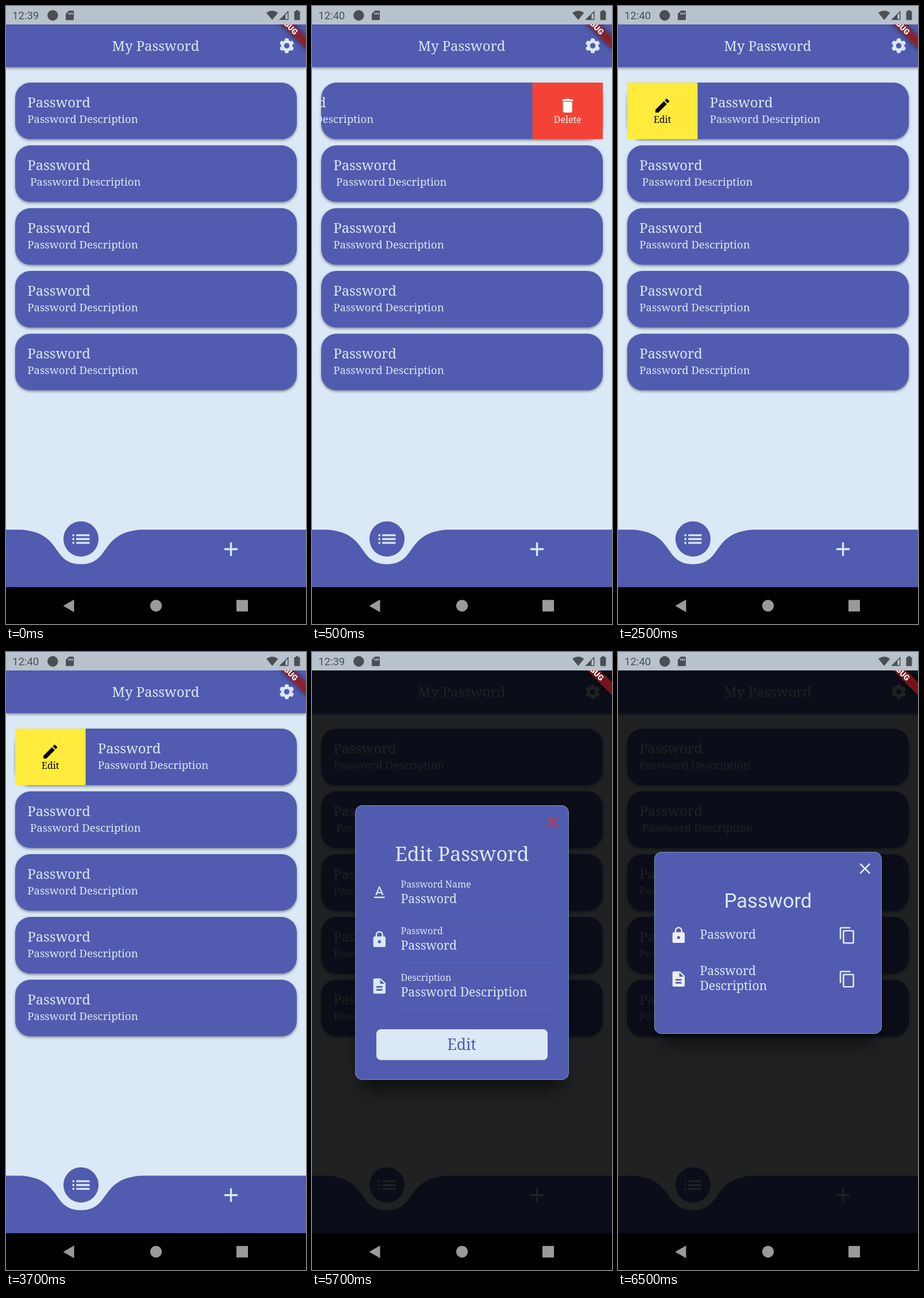
An HTML page for the animation above (8 s loop, 522 by 1073 pixels).

```html
<!DOCTYPE html>
<html lang="en">
<head>
<meta charset="utf-8">
<title>My Password</title>
<style>
  html, body { margin: 0; width: 100%; height: 100%; overflow: hidden; background: #dbe8f5; }
  svg { display: block; width: 100%; height: 100%; }
  text { font-family: "Noto Serif", serif; white-space: pre; }
  .sans { font-family: Roboto, sans-serif; }
</style>
</head>
<body>
<svg id="stage" viewBox="0 0 522 1073"></svg>
<script>
const LIGHT = '#dbe8f5', INDIGO = '#515bb0', GREY = '#4b4f54';
const DP = 522 / 392.727; // pixels per density-independent unit
const LOOP = 8000;

const ICONS = {
  list: 'M3 13h2v-2H3zm0 4h2v-2H3zm0-8h2V7H3zm4 4h14v-2H7zm0 4h14v-2H7zM7 7v2h14V7z',
  add: 'M19 13h-6v6h-2v-6H5v-2h6V5h2v6h6z',
  trash: 'M6 19c0 1.1.9 2 2 2h8c1.1 0 2-.9 2-2V7H6zM19 4h-3.5l-1-1h-5l-1 1H5v2h14z',
  pencil: 'M3 17.25V21h3.75L17.81 9.94l-3.75-3.75zM20.71 7.04c.39-.39.39-1.02 0-1.41l-2.34-2.34c-.39-.39-1.02-.39-1.41 0l-1.83 1.83 3.75 3.75z',
  close: 'M19 6.41L17.59 5 12 10.59 6.41 5 5 6.41 10.59 12 5 17.59 6.41 19 12 13.41 17.59 19 19 17.59 13.41 12z',
  letter: 'M5 17v2h14v-2zm4.5-4.2h5l.9 2.2h2.1L12.75 4h-1.5L6.5 15h2.1zM12 5.98L13.87 11h-3.74z',
  lock: 'M18 8h-1V6A5 5 0 0 0 7 6v2H6a2 2 0 0 0-2 2v10a2 2 0 0 0 2 2h12a2 2 0 0 0 2-2V10a2 2 0 0 0-2-2zm-6 9a2 2 0 1 1 0-4 2 2 0 0 1 0 4zm3.1-9H8.9V6a3.1 3.1 0 0 1 6.2 0z',
  page: 'M14 2H6a2 2 0 0 0-2 2v16a2 2 0 0 0 2 2h12a2 2 0 0 0 2-2V8zm2 16H8v-2h8zm0-4H8v-2h8zm-3-5V3.5L18.5 9z',
  copy: 'M16 1H4a2 2 0 0 0-2 2v14h2V3h12zm3 4H8a2 2 0 0 0-2 2v14a2 2 0 0 0 2 2h11a2 2 0 0 0 2-2V7a2 2 0 0 0-2-2zm0 16H8V7h11z'
};

const icon = (name, x, y, fill = LIGHT, size = 24) =>
  `<path fill="${fill}" fill-rule="evenodd" d="${ICONS[name]}"
    transform="translate(${x} ${y}) scale(${size * DP / 24}) translate(-12 -12)"/>`;

const text = (label, x, y, size, fill = LIGHT, extra = '') =>
  `<text x="${x}" y="${y}" font-size="${size * DP}" fill="${fill}" ${extra}>${label}</text>`;

const rect = (x, y, w, h, fill, r = 0, extra = '') =>
  `<rect x="${x}" y="${y}" width="${w}" height="${h}" rx="${r}" fill="${fill}" ${extra}/>`;

const MIDDLE = 'text-anchor="middle"';

function gear(x, y) {
  const tooth = [0, 60, 120, 180, 240, 300].map(a =>
    `<path d="M-3.1-6L-2.2-9.2Q-2.1-9.6-1.7-9.6H1.7Q2.1-9.6 2.2-9.2L3.1-6z" transform="rotate(${a})"/>`).join('');
  return `<g transform="translate(${x} ${y}) scale(${DP})" fill="${LIGHT}">${tooth}
    <circle r="5.5" fill="none" stroke="${LIGHT}" stroke-width="3.8"/></g>`;
}

function cards() {
  let out = '';
  for (let i = 0; i < 5; i++) {
    const y = 133 + 109 * i;
    out += rect(16, y, 490, 98.2, INDIGO, 26.6, 'filter="url(#lift)"');
    out += `<g ${i ? '' : 'id="slider"'}>` +
      text('Password', 37.2, y + 43, 18) +
      text('Password Description', i === 1 ? 42 : 37.2, y + 70, 14) + '</g>';
  }
  return out;
}

function bottomBar() {
  const w = 522, h = 75 * DP, top = 1009 - h;
  const p = (fx, fy) => `${fx * w} ${top + fy * h} `;
  return `<path fill="${INDIGO}" d="M${p(0, 0)}L${p(.05, 0)}C${p(.19, .05)}${p(.15, .6)}${p(.25, .6)}` +
    `C${p(.35, .6)}${p(.31, .05)}${p(.45, 0)}L${p(1, 0)}V1010H0z"/>
    <circle cx="130.5" cy="925.3" r="30.6" fill="${INDIGO}"/>` +
    icon('list', 130.5, 925.5, LIGHT, 30) + icon('add', 391.5, 943, LIGHT, 30);
}

const debugRibbon = () => `<g clip-path="url(#belowStatus)"><g transform="translate(522 0) rotate(45)">
  ${rect(-53.2, 37.2, 106.4, 16, '#000', 0, 'opacity=".5" filter="url(#soft)"')}
  ${rect(-53.2, 37.2, 106.4, 16, '#b71c1c', 0, 'opacity=".63"')}
  ${text('DEBUG', 0, 50, 10.2, '#fff', MIDDLE + ' class="sans" font-weight="900"')}</g></g>`;

const statusBar = () => rect(0, 0, 522, 32, '#b8c2cc') +
  text('', 11, 23, 14, GREY, 'id="clock" class="sans"') +
  `<g fill="${GREY}">
    <circle cx="81.3" cy="16.2" r="9.2"/>
    <path fill-rule="evenodd" d="M109.5 8H116.500q1.500 0 1.500 1.500V23q0 1.500-1.500 1.500H105.500q-1.500 0-1.500-1.500V13.500zM108.500 11.500v3.500h1.800v-3.500zm3 0v3.500h1.800v-3.500zm3 0v3.500h1.800v-3.500z"/>
    <path d="M453 11.700Q463.200 4.300 473.400 11.700L463.200 24.300z"/>
    <path fill-rule="evenodd" d="M491.500 8V24.300H475.200zM490 11.700L486.300 15.400V22.800H490z"/>
    <path d="M504.500 7h4v2h1.700q1.300 0 1.300 1.300V23q0 1.500-1.300 1.500h-7.400q-1.300 0-1.300-1.500V10.300q0-1.300 1.300-1.300h1.700z"/>
  </g>`;

const navBar = () => rect(0, 1009, 522, 64, '#000') + `<g fill="#9a9a9a">
  <path d="M118.500 1030.500V1052.500L99.500 1041.500z"/><circle cx="261" cy="1041.200" r="10.200"/></g>` +
  rect(401, 1031.2, 20, 20, '#9a9a9a', 1);

const panel = (x, y, w, h) =>
  rect(x + 12, y + 30, w - 24, h - 15, '#000', 12, 'opacity=".6" filter="url(#glow)"') +
  rect(x + .6, y + .6, w - 1.2, h - 1.2, INDIGO, 12, 'stroke="#6c8aa8" stroke-width="1.200"');

function editDialog() {
  const fields = [
    ['letter', 'Password Name', 'Password'],
    ['lock', 'Password', 'Password'],
    ['page', 'Description', 'Password Description']
  ].map(([name, label, value], i) => {
    const y = 81 * i;
    return icon(name, 117.3, 418 + y) + text(label, 154.5, 409 + y, 12) +
      text(value, 154.5, 436 + y, 16) + rect(155, 458 + y, 265, 1.3, '#4b69c6');
  }).join('');
  return panel(75, 266, 372, 477) + icon('close', 418, 295.8, '#df3434') +
    text('Edit Password', 261, 363, 26, LIGHT, MIDDLE) + fields +
    rect(112, 655, 298, 53.5, LIGHT, 8) + text('Edit', 260.5, 691, 20, INDIGO, MIDDLE);
}

const viewDialog = () => panel(63, 347, 396, 316) + icon('close', 429.7, 376, '#e8f0f8') +
  text('Password', 261, 444, 26, LIGHT, MIDDLE + ' class="sans"') +
  icon('lock', 105.4, 491.8, '#eceff3') + text('Password', 142.4, 498, 16) + icon('copy', 399, 492) +
  icon('page', 105.4, 567.8, '#eceff3') + text('Password', 142.4, 561, 16) +
  text('Description', 142.4, 587, 16) + icon('copy', 399, 568);

const swipeAction = (x, fill, ink, name, label) => rect(x, 133, 122.5, 98.2, fill) +
  icon(name, x + 61.2, 173, ink) + text(label, x + 61.2, 203, 12, ink, MIDDLE);

const group = (id, body) => `<g id="${id}">${body}</g>`;

document.getElementById('stage').innerHTML = `<defs>
  <filter id="lift" x="-10%" y="-20%" width="120%" height="150%">
    <feDropShadow dx="0" dy="2" stdDeviation="2.200" flood-opacity=".42"/></filter>
  <filter id="soft" x="-50%" y="-150%" width="200%" height="400%"><feGaussianBlur stdDeviation="4.500"/></filter>
  <filter id="glow" x="-20%" y="-20%" width="140%" height="140%"><feGaussianBlur stdDeviation="16"/></filter>
  <clipPath id="belowStatus"><path d="M0 32H522V1009H0z"/></clipPath></defs>` +
  rect(0, 0, 522, 1073, LIGHT) +
  rect(0, 32, 522, 74.2, INDIGO, 0, 'filter="url(#lift)"') +
  text('My Password', 260.5, 77.5, 18, LIGHT, MIDDLE) + gear(488.5, 69) + cards() +
  group('delete', swipeAction(383.5, '#f44336', '#fff', 'trash', 'Delete')) +
  group('edit', swipeAction(16, '#ffeb3b', '#000', 'pencil', 'Edit')) +
  bottomBar() +
  group('dim', rect(0, 32, 522, 977, '#000', 0, 'opacity=".86"')) +
  group('editDialog', editDialog()) + group('viewDialog', viewDialog()) +
  debugRibbon() + statusBar() + navBar();

const SCENES = [
  { until: 500, clock: '12:39', shift: 0, show: [] },
  { until: 2500, clock: '12:40', shift: -122.5, show: ['delete'] },
  { until: 4500, clock: '12:40', shift: 122.5, show: ['edit'] },
  { until: 6500, clock: '12:39', shift: 0, show: ['dim', 'editDialog'] },
  { until: LOOP, clock: '12:40', shift: 0, show: ['dim', 'viewDialog'] }
];
const LAYERS = ['delete', 'edit', 'dim', 'editDialog', 'viewDialog'];
const el = id => document.getElementById(id);

function render(ms) {
  const scene = SCENES.find(s => ms < s.until);
  el('clock').textContent = scene.clock;
  el('slider').setAttribute('transform', `translate(${scene.shift} 0)`);
  for (const id of LAYERS) el(id).style.display = scene.show.includes(id) ? '' : 'none';
}

const start = performance.now();
function tick() {
  render((performance.now() - start) % LOOP);
  requestAnimationFrame(tick);
}
tick();
</script>
</body>
</html>
```
